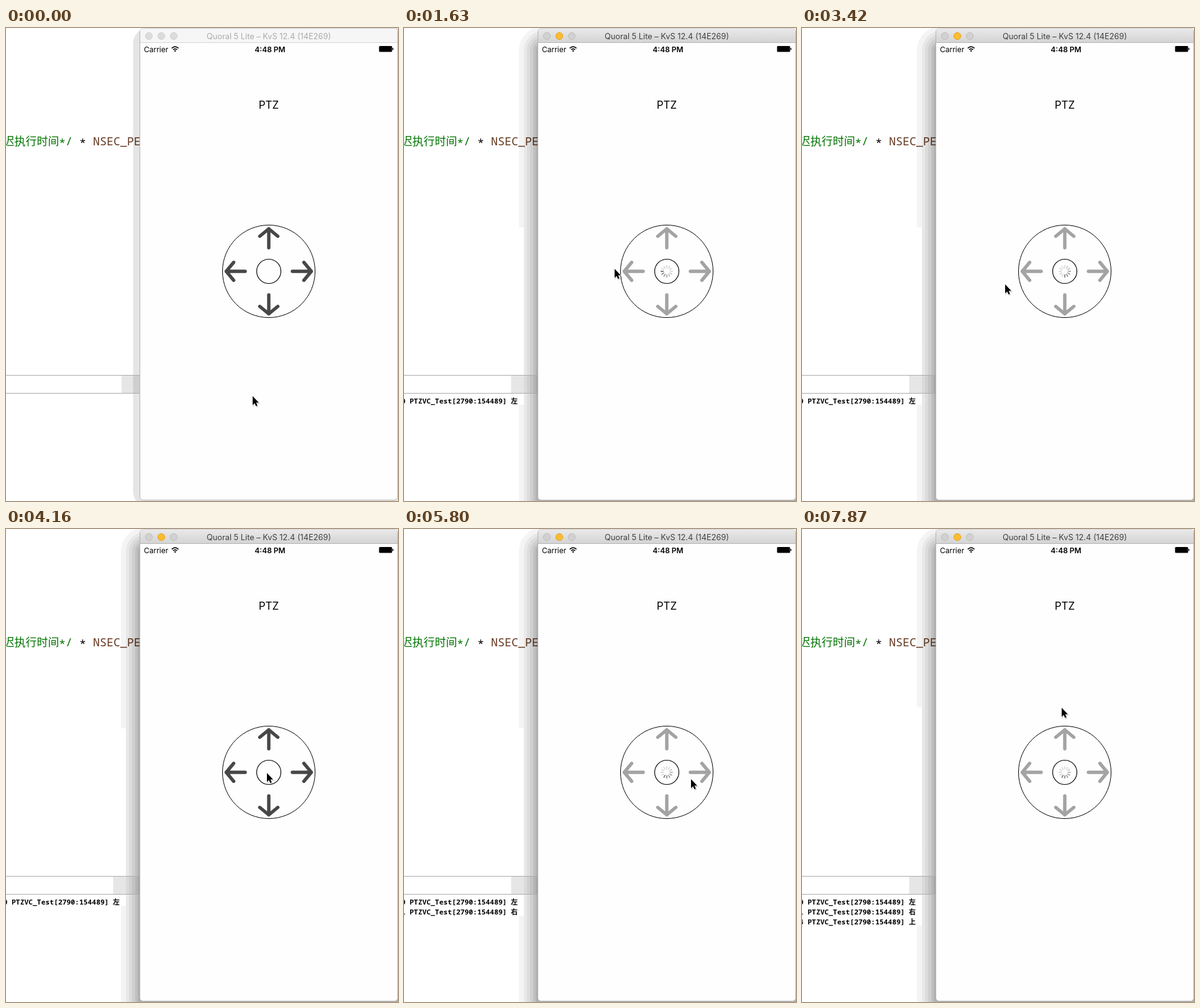
An HTML page that plays this animation: 631 px wide and 762 px high, repeating every 8000 ms.

```html
<!DOCTYPE html>
<html lang="zh">
<head>
<meta charset="utf-8">
<title>PTZ</title>
<style>
html, body { margin: 0; width: 100%; height: 100%; overflow: hidden; background: #fff; }
svg { display: block; width: 631px; height: 762px; }
text { font-family: Inter, sans-serif; white-space: pre; }
.code text { font: 18.3px "Noto Sans Mono", monospace; }
.code .cjk { font: 18px "Noto Sans CJK SC", "Noto Sans CJK", sans-serif; }
.log { font: bold 11.35px "Noto Sans Mono", monospace; }
.log .cjk { font: bold 11px "Noto Sans CJK SC", "Noto Sans CJK", sans-serif; }
</style>
</head>
<body>
<svg viewBox="0 0 631 762">
  <defs>
    <linearGradient id="bar" x2="0" y2="1">
      <stop stop-color="#e9e9e9"/><stop offset="1" stop-color="#d3d3d3"/>
    </linearGradient>
    <g id="arrow"><path d="M38 0H68.5M56.5 -14.5L68.5 0L56.5 14.5"/></g>
  </defs>
  <rect width="631" height="762" fill="#fff"/>
  <g class="code">
    <text class="cjk" x="-4.5" y="189" fill="#007400">迟执行时间</text>
    <text x="85" y="192" fill="#007400">*</text>
    <text x="96" y="189" fill="#007400">/</text>
    <text x="118" y="192">*</text>
    <text x="140" y="189" fill="#643820">NSEC_PER</text>
  </g>
  <g id="outer"></g>
  <rect id="cleared" width="193" fill="#fff"/>
  <rect id="thumb" y="559" width="50" height="29" fill="#e6e6e6"/>
  <g id="inner"></g>
  <rect id="idleShadow" x="204.5" y="0" width="450" height="772" rx="25" fill-opacity=".1"/>
  <path d="M0 559.5H216M0 588.5H216" stroke="#ababab"/>
  <g id="logs"></g>

  <rect x="215.5" y="1" width="415" height="759.5" rx="5" fill="#fefefe" stroke="#b4b4b4"/>
  <path id="titleBar" d="M216 24V6q0-5 5-5H625q5 0 5 5V24Z"/>
  <path id="titleLine" d="M216 23.5H630"/>
  <g id="lights"></g>
  <text id="title" x="423" y="18" font-size="12.8" text-anchor="middle">Quoral 5 Lite – KvS 12.4 (14E269)</text>

  <text x="222" y="39" font-size="12">Carrier</text>
  <text x="425" y="39" font-size="12" font-weight="600" text-anchor="middle">4:48 PM</text>
  <g fill="none" stroke="#000" stroke-width="1.6">
    <path d="M266.8 32.6q5.4-4.8 10.8 0M268.9 35q3.3-2.9 6.6 0"/>
    <path d="M270.5 36.4q1.7-1.4 3.4 0L272.2 38.4Z" fill="#000" stroke="none"/>
  </g>
  <rect x="600.5" y="29" width="21" height="9.5" rx="1.5"/>
  <rect x="622" y="32" width="1.5" height="3.5" rx=".7"/>
  <text x="423" y="130" font-size="17" text-anchor="middle">PTZ</text>

  <g transform="translate(423 392)" fill="none">
    <circle r="74.5" stroke="#000"/>
    <circle r="19.5" stroke="#000" stroke-width="1.15"/>
    <g id="arrows" stroke-width="5.4" stroke-linecap="round" stroke-linejoin="round">
      <use href="#arrow"/>
      <use href="#arrow" transform="rotate(90)"/>
      <use href="#arrow" transform="rotate(180)"/>
      <use href="#arrow" transform="rotate(270)"/>
    </g>
    <g id="spinner" stroke-width="1.8" stroke-linecap="round"></g>
  </g>
  <g id="cursor">
    <path d="M0 0V14.5L3.3 11.4L5.4 16.2L7.8 15.2L5.7 10.5H10Z" transform="translate(.8 1.4)"
      fill="#000" fill-opacity=".12" stroke="#000" stroke-opacity=".1" stroke-width="2"/>
    <path d="M0 0V14.5L3.3 11.4L5.4 16.2L7.8 15.2L5.7 10.5H10Z"
      stroke="#fff" stroke-width="1.4" paint-order="stroke"/>
  </g>
</svg>
<script>
const LOOP = 8000, STEPS = 54, STEP_MS = LOOP / STEPS;
const ACTIVATE = 5, LOADING_STEPS = 14;
const $ = id => document.getElementById(id);

// Each command: step it fires on, log label and the area it repaints.
const commands = [
  { at: 10, digit: 0, label: '左', top: 321 },
  { at: 32, digit: 1, label: '右', top: 321 },
  { at: 53, digit: 4, label: '上', top: 287 }
];

// Pointer path: step, x, y
const path = [
  [0, 397, 593], [1, 398, 585], [4, 420, 392], [6, 421, 388], [8, 421, 388],
  [10, 352, 388], [11, 339, 388], [15, 339, 388], [18, 324, 402], [23, 327, 413],
  [27, 415, 395], [29, 425, 391], [31, 489, 393], [33, 502, 394], [35, 501, 395],
  [38, 474, 402], [42, 425, 407], [45, 422, 406], [46, 421, 400], [50, 422, 389],
  [52, 419, 312], [53, 418, 288]
];

function add(parent, tag, attrs, html = '') {
  const el = document.createElementNS('http://www.w3.org/2000/svg', tag);
  set(el, attrs);
  el.innerHTML = html;
  return parent.appendChild(el);
}

function set(el, attrs) {
  for (const name in attrs) el.setAttribute(name, attrs[name]);
}

function show(el, on) {
  el.style.display = on ? '' : 'none';
}

function addShadow(parent, spread, alpha) {
  add(parent, 'rect', {
    x: 216 - spread, y: 28 - spread, width: 415 + 2 * spread,
    height: 747 + 2 * spread, rx: spread + 8, 'fill-opacity': alpha
  });
}

addShadow($('outer'), 31, .045);
[[23, .05], [18, .05], [13, .06], [8, .07], [4, .08]]
  .forEach(([spread, alpha]) => addShadow($('inner'), spread, alpha));

const lights = [230, 250, 270].map(cx => add($('lights'), 'circle', { cx, cy: 13, r: 5.6 }));

const logs = commands.map(({ digit, label }, i) => {
  const g = add($('logs'), 'g', { class: 'log', transform: `translate(0 ${605 + 16 * i})` });
  add(g, 'text', { class: 'log', x: -4.6 }, `${digit} PTZVC_Test[2790:154489]`);
  add(g, 'text', { class: 'cjk', x: 172 }, label);
  return g;
});

const spokes = Array.from({ length: 12 }, (_, i) =>
  add($('spinner'), 'path', { d: 'M0-5.6V-9.2', transform: `rotate(${30 * i})` }));

function pointerAt(step) {
  const next = Math.max(1, path.findIndex(p => p[0] >= step));
  const [s0, x0, y0] = path[next - 1], [s1, x1, y1] = path[next];
  const f = (step - s0) / (s1 - s0);
  return [x0 + (x1 - x0) * f, y0 + (y1 - y0) * f];
}

function drawWindow(active) {
  show($('outer'), active);
  show($('inner'), active);
  show($('idleShadow'), !active);
  set($('thumb'), { x: active ? 172.5 : 186 });
  set($('titleBar'), { fill: active ? 'url(#bar)' : '#f6f6f6' });
  set($('titleLine'), { stroke: active ? '#b5b5b5' : '#d5d5d5' });
  set($('title'), { fill: active ? '#404040' : '#ababab' });
  lights.forEach((el, i) => set(el, active && i === 1
    ? { fill: '#fdbc2f', stroke: '#dfa023' }
    : { fill: active ? '#d1d1d1' : '#dcdcdc', stroke: active ? '#bcbcbc' : '#d0d0d0' }));
}

function drawSpinner(elapsed) {
  const head = Math.round(7 + elapsed * STEP_MS * 12 / 1000);
  spokes.forEach((el, i) => {
    const age = (head - i + 120) % 12;
    const grey = Math.min(218, 128 + age * 15);
    set(el, { stroke: `rgb(${grey},${grey},${grey})` });
  });
}

function draw(time) {
  const step = Math.min(STEPS - 1, Math.floor((time % LOOP + 10) / STEP_MS));
  const fired = commands.filter(c => step >= c.at);
  const last = fired[fired.length - 1];
  const loading = !!last && step < last.at + LOADING_STEPS;

  drawWindow(step >= ACTIVATE);
  logs.forEach((el, i) => show(el, i < fired.length));
  show($('cleared'), !!last);
  if (last) set($('cleared'), { y: last.top, height: 591 + 16 * fired.length - last.top });

  set($('arrows'), { stroke: loading ? '#a3a3a3' : '#474747' });
  show($('spinner'), loading);
  if (loading) drawSpinner(step - last.at);

  set($('cursor'), { transform: `translate(${pointerAt(step).map(Math.round)})` });
}

let start;
function tick(now) {
  start ??= now;
  draw(now - start);
  requestAnimationFrame(tick);
}
draw(0);
requestAnimationFrame(tick);
</script>
</body>
</html>
```
